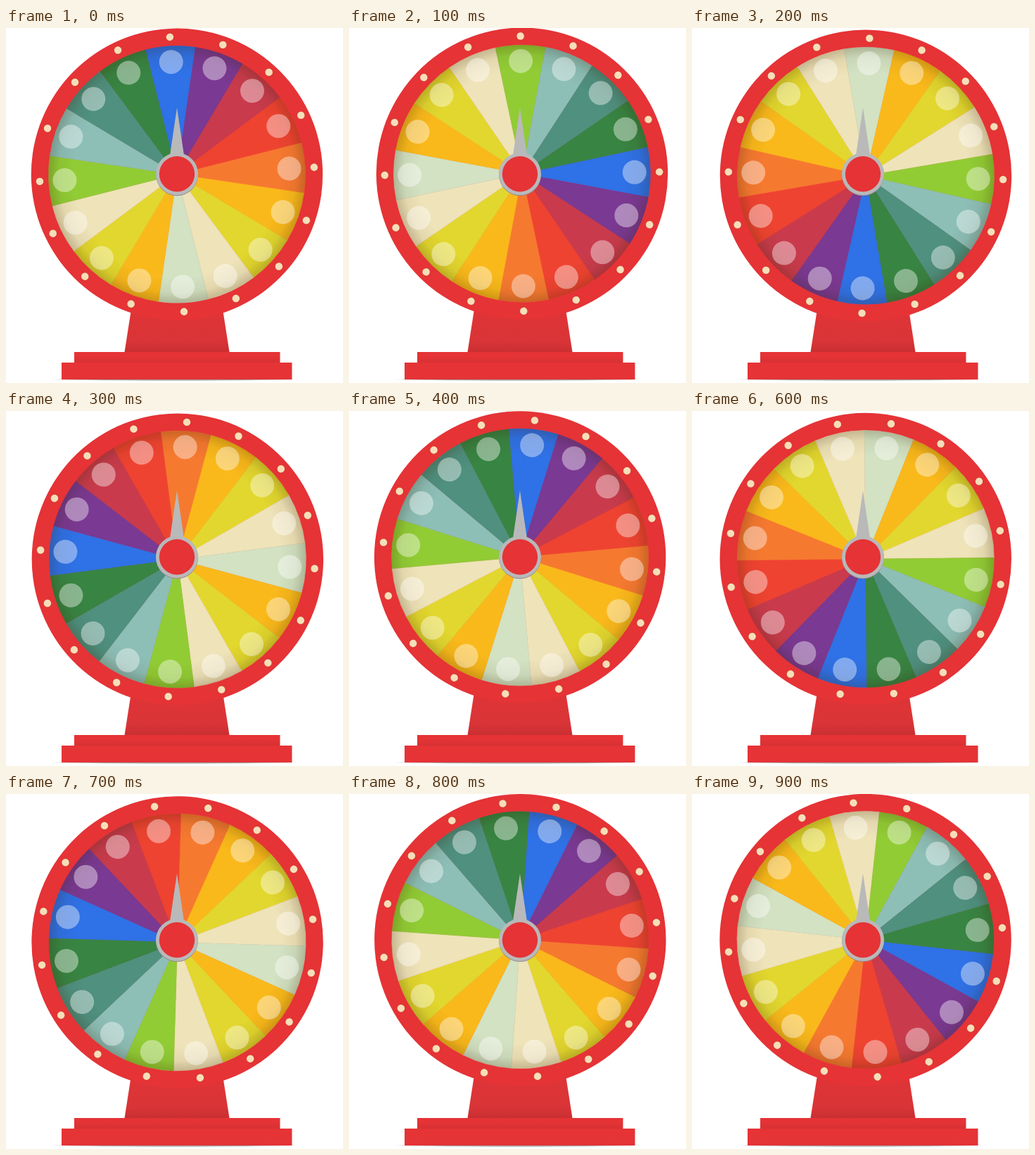
Recreate the animation shown at these times as an HTML page. Size 479 px wide and 504 px high, loop 1000 ms.

```html
<!DOCTYPE html>
<html lang="en">
<head>
<meta charset="utf-8">
<title>Prize wheel</title>
<style>
  html, body { margin: 0; width: 100%; height: 100%; overflow: hidden; background: #fff; }
  svg { display: block; width: 100%; height: 100%; }
</style>
</head>
<body>
<svg viewBox="0 0 479 504">
  <defs>
    <radialGradient id="shade" gradientUnits="userSpaceOnUse" cx="0" cy="0" r="182.5">
      <stop offset=".8" stop-color="#321e00" stop-opacity="0"/>
      <stop offset=".92" stop-color="#321e00" stop-opacity=".06"/>
      <stop offset="1" stop-color="#321e00" stop-opacity=".22"/>
    </radialGradient>
    <radialGradient id="floor">
      <stop offset=".6" stop-color="#666" stop-opacity=".6"/>
      <stop offset="1" stop-color="#666" stop-opacity="0"/>
    </radialGradient>
    <linearGradient id="leg" x1="0" y1="0" x2="0" y2="1">
      <stop offset=".3" stop-color="#df3437"/>
      <stop offset=".8" stop-color="#d93437"/>
      <stop offset="1" stop-color="#c92f32"/>
    </linearGradient>
    <linearGradient id="step" x1="0" y1="0" x2="0" y2="1">
      <stop offset=".4" stop-color="#e53336"/>
      <stop offset="1" stop-color="#d73134"/>
    </linearGradient>
  </defs>
  <ellipse cx="239" cy="499" rx="182" ry="2" fill="url(#floor)"/>
  <path d="M181 380H305L317.500 460H168.500Z" fill="url(#leg)"/>
  <rect x="97" y="460" width="292.500" height="15" fill="url(#step)"/>
  <rect x="79" y="475" width="327.500" height="24" fill="#e53336"/>
  <g id="wheel"></g>
  <path d="M243 113L253.500 184H232.500Z" fill="#b9b9ba"/>
  <circle cx="243" cy="208.300" r="30" fill="#96898c"/>
  <circle cx="243" cy="207.300" r="30" fill="#b9b9ba"/>
  <circle cx="243" cy="207.300" r="25.200" fill="#e53336"/>
</svg>
<script>
const NS = "http://www.w3.org/2000/svg";
const wheel = document.getElementById("wheel");
const colors = [
  "#2f71e6", "#7a3992", "#c93b4c", "#ef4331", "#f67930", "#fab91b", "#e2d72e", "#efe3b9",
  "#d2e2c2", "#fab91b", "#e2d72e", "#efe3b9", "#91cc35", "#8dbfb7", "#4f907f", "#388442"
];
const SLICE = 360 / colors.length;
const RADIUS = 182.5;

// Angles run clockwise from the top.
function polar(r, deg) {
  const a = deg * Math.PI / 180;
  return [r * Math.sin(a), -r * Math.cos(a)];
}

function add(tag, attrs) {
  const el = document.createElementNS(NS, tag);
  for (const key in attrs) el.setAttribute(key, attrs[key]);
  wheel.appendChild(el);
}

function disc(r, fill, [cx, cy] = [0, 0], opacity = 1) {
  add("circle", { cx, cy, r, fill, opacity });
}

disc(207.2, "#e53336");
colors.forEach((fill, i) => {
  const mid = i * SLICE;
  const from = polar(RADIUS, mid - SLICE / 2);
  const to = polar(RADIUS, mid + SLICE / 2);
  add("path", {
    d: `M0 0L${from}A${RADIUS} ${RADIUS} 0 0 1 ${to}Z`,
    fill, stroke: fill, "stroke-width": 0.4
  });
});
disc(RADIUS, "url(#shade)");
colors.forEach((_, i) => {
  disc(17, "#fff", polar(159.8, i * SLICE), 0.4);
  const spot = polar(195.2, i * SLICE);
  disc(5.9, "#c9542f", spot, 0.6);
  disc(5.2, "#f6deba", spot);
});

// The wheel sits slightly off its axle, so its centre circles the pivot.
function draw(ms) {
  const tick = Math.floor((ms % 1000) / 100);
  const angle = -2.95 + 92.27 * tick;
  wheel.setAttribute("transform", `translate(245 208.7) rotate(${angle}) translate(-2 -1)`);
}

const start = performance.now();
function loop() {
  draw(performance.now() - start);
  requestAnimationFrame(loop);
}
draw(0);
requestAnimationFrame(loop);
</script>
</body>
</html>
```
